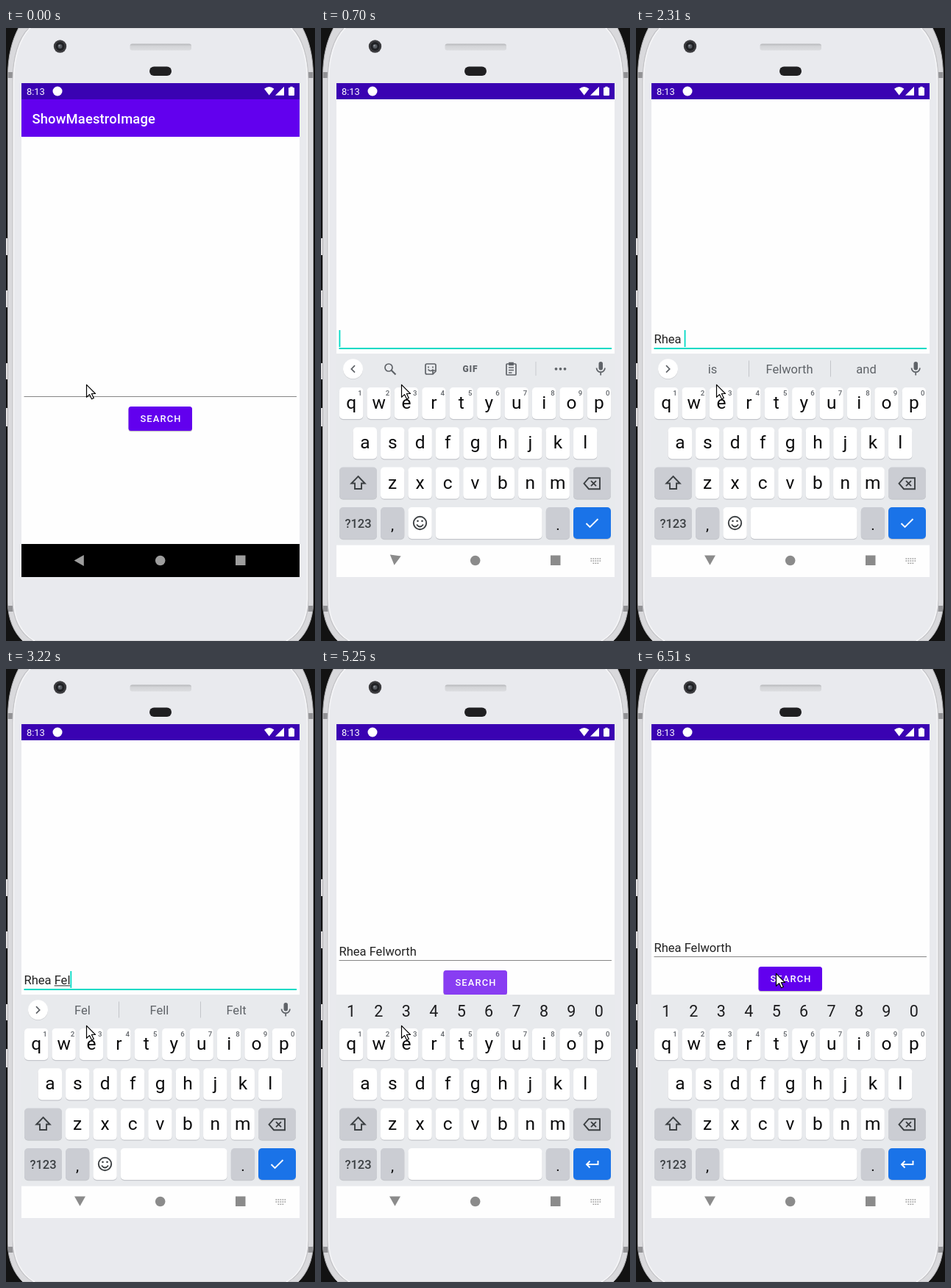
Write an HTML page that moves like this. It is 420 by 834 pixels and loops after 8 s.

```html
<!DOCTYPE html>
<html lang="en">
<head>
<meta charset="utf-8">
<title>Image search</title>
<style>
html,body{margin:0;width:100%;height:100%;overflow:hidden;background:#000}
svg{display:block;width:100%;height:100%}
text{font-family:Roboto,sans-serif;white-space:pre}
.mid{text-anchor:middle}
.line{fill:none;stroke:#5f6368;stroke-width:1.7}
.dark{stroke:#3c4043;stroke-width:1.9}
</style>
</head>
<body>
<svg id="stage" viewBox="0 0 420 834">
  <defs>
    <clipPath id="screen"><rect x="21" y="75" width="378" height="672"/></clipPath>
    <clipPath id="btnClip"><rect x="166.5" y="515" width="86.5" height="33" rx="3.5"/></clipPath>
    <linearGradient id="slot" x2="0" y2="1"><stop stop-color="#b4b5b8"/><stop offset=".35" stop-color="#d3d4d7"/><stop offset="1" stop-color="#dcdde0"/></linearGradient>
  </defs>

  <!-- phone body -->
  <rect width="420" height="834" fill="#121212"/>
  <path d="M0 286h3v23H0zM0 357h3v23H0zM0 456h3v22H0zM0 517h3v25H0z" fill="#e4e2e3"/>
  <path d="M17 0C8 17 2.500 38 2.500 66V782C2.500 804 11 823 23 834H397C409 823 417.500 804 417.500 782V66C417.500 38 412 17 403 0Z" fill="#d9d9dc" stroke="#b2b2b5"/>
  <path d="M2.500 60h6.500v8H2.500zM411 60h6.500v8H411zM2.500 786h7v8H3zM410.500 786h7l-.500 8h-6.500z" fill="#929295"/>
  <path d="M31 0C17 14 9 40 9 72V777C9 805 20 824 37 834H383C400 824 411 805 411 777V72C411 40 403 14 389 0Z" fill="#e9eaee" stroke="#c3c3c6" stroke-width="1.200"/>
  <path d="M33 0C19 14 10.500 40 10.500 72V777C10.500 805 22 824 39 834M387 0C401 14 409.500 40 409.500 72V777C409.500 805 398 824 381 834" fill="none" stroke="#f5f5f7" stroke-width="1.500"/>
  <circle cx="73.500" cy="25" r="8.700" fill="#3c3c3f"/>
  <circle cx="73.500" cy="25" r="6" fill="#202124"/>
  <circle cx="73.500" cy="25" r="3" fill="#565a60"/>
  <circle cx="72.500" cy="24" r="1.200" fill="#8d9197"/>
  <rect x="168.500" y="21.500" width="83.500" height="9" rx="3" fill="url(#slot)"/>
  <rect x="195" y="52.500" width="30" height="12.500" rx="6.200" fill="#1f1f21"/>

  <g clip-path="url(#screen)">
    <rect x="21" y="75" width="378" height="672" fill="#fefefe"/>
    <g id="page">
      <rect x="21" y="97" width="378" height="51" fill="#6200ee"/>
      <text x="35.500" y="130" font-size="18.380" font-weight="500" letter-spacing=".17" fill="#fff">ShowMaestroImage</text>
      <text id="entry" x="24.500" y="495" font-size="16.540" fill="#212121"></text>
      <rect id="under" y="496.400" height="1" fill="#212121"/>
      <rect id="caret" y="477" width="1.800" height="23" fill="#03dac5"/>
      <rect id="rule" x="24.500" y="501" width="370.500"/>
      <rect x="166.500" y="516.200" width="86.500" height="33" rx="3.500" fill="#000" opacity=".22"/>
      <g clip-path="url(#btnClip)">
        <rect x="166" y="515" width="88" height="33" fill="#6200ee"/>
        <rect id="focus" x="166" y="515" width="88" height="33" fill="#fff"/>
        <circle id="ripple" cx="190" cy="527" fill="#fff"/>
      </g>
      <text class="mid" x="210.500" y="536.300" font-size="12.870" font-weight="500" letter-spacing="1.150" fill="#fff">SEARCH</text>
      <rect x="21" y="702" width="378" height="240" fill="#000"/>
    </g>

    <g id="board">
      <rect x="21" y="443" width="378" height="261" fill="#e8eaed"/>
      <rect x="21" y="703.500" width="378" height="44" fill="#fefefe"/>
      <g id="keys"></g>
      <g id="head">
        <circle cx="43.500" cy="464.500" r="13.500" fill="#c9cbcf"/>
        <circle cx="43.500" cy="463.700" r="13.500" fill="#fff"/>
        <path id="chev" class="line"/>
        <g id="tools" class="line">
          <circle cx="92" cy="462" r="5"/><path d="M95.500 465.500l6 6" stroke-width="2.200"/>
          <path d="M144 457h10q2 0 2 2v8l-4 4h-8q-2 0-2-2v-10q0-2 2-2zM156 466h-4v5M145.500 464.500q3.500 4 7 0"/>
          <path d="M146 460.500v2M152 460.500v2"/>
          <text class="mid" x="203" y="468" font-size="12" font-weight="900" letter-spacing=".8" fill="#5f6368" stroke="none">GIF</text>
          <path d="M253 457h11q1 0 1 1v13q0 1-1 1h-11q-1 0-1-1v-13q0-1 1-1zM255 462h7M255 465.500h7M255 469h4.500M256 457.200h5"/>
          <path d="M256 455.500h5v3h-5z" fill="#5f6368"/>
          <path d="M292 454v19" stroke="#c9cbcf" stroke-width="1"/>
          <path d="M319.500 463.800h.01M325.500 463.800h.01M331.500 463.800h.01" stroke-width="3.800" stroke-linecap="round"/>
        </g>
        <g id="hints" font-size="16.540" fill="#5f6368">
          <path d="M153.500 452.500v22M264.500 452.500v22" stroke="#c3c5c9"/>
          <text class="mid" x="104" y="470"></text><text class="mid" x="208.500" y="470"></text><text class="mid" x="313" y="470"></text>
        </g>
        <rect x="377.500" y="454" width="5.500" height="11.500" rx="2.750" fill="#5f6368"/>
        <path class="line" d="M374.500 462.500a5.700 5.700 0 0 0 11.400 0M380.200 468v4.500"/>
      </g>
      <g id="digits" font-size="21.500" fill="#1d1d1f"></g>
      <path id="shift" class="line dark" d="M50.500 610l9.200 9.500h-4.700v7.500h-9v-7.500h-4.700z"/>
      <path class="line dark" d="M364 612.200h15v15h-15l-6.500-7.500zM367 616.200l7 7M374 616.200l-7 7"/>
      <g id="smile" class="line dark"><circle cx="134.500" cy="673.500" r="8.700"/><path d="M130 675.500q4.500 6 9 0"/><path d="M131.500 670.800h.01M137.500 670.800h.01" stroke-width="2.600" stroke-linecap="round"/></g>
      <path id="act" fill="none" stroke="#fff" stroke-width="1.900"/>
    </g>

    <g id="nav">
      <path id="back" d="M-7.200 0L6 -7.500V7.500Z"/>
      <circle cx="209.700" cy="724.500" r="6.800"/>
      <rect x="312" y="717.500" width="13.500" height="13.500"/>
      <path id="switch" d="M366.500 722h14M366.500 725h14M369.500 728.200h8.500" fill="none" stroke="#9b9b9b" stroke-width="1.500" stroke-dasharray="1.700 1.300"/>
    </g>

    <!-- status bar -->
    <rect x="21" y="75" width="378" height="22" fill="#3a02b2"/>
    <g fill="#fff">
      <text x="28" y="91" font-size="12.870">8:13</text>
      <circle cx="70" cy="86" r="6.500"/>
      <path d="M351 82.800Q357.700 77.300 364.400 82.800L357.700 91.500ZM366 91.700L378 79.700V91.700Z"/>
      <path d="M384 82q0-1 1-1h1.300v-1.300h3.400v1.300h1.300q1 0 1 1v9q0 1-1 1h-6q-1 0-1-1z"/>
    </g>
  </g>
  <path id="mouse" d="M0 0V17L4 13.300L7 19.500L9.800 18.200L6.900 12.200H12Z" fill="#fff" stroke="#000" stroke-width="1.200" stroke-linejoin="round"/>
</svg>
<script>
const LOOP = 8000, STEP = 70, PITCH = 37.42;
const $ = id => document.getElementById(id);
const set = (el, attrs) => { for (const k in attrs) el.setAttribute(k, attrs[k]); return el; };
const add = (parent, tag, attrs, text) => {
  const el = set(document.createElementNS('http://www.w3.org/2000/svg', tag), attrs);
  if (text) el.textContent = text;
  parent.appendChild(el);
  return el;
};
const show = (el, on) => { el.style.display = on ? '' : 'none'; };
const clamp = v => Math.max(0, Math.min(1, v));
const decel = v => 1 - (1 - clamp(v)) ** 2;
const ease = v => { v = clamp(v); return v * v * (3 - 2 * v); };

// keyboard
const keys = $('keys'), letters = [];
function key(x, y, w, fill = '#fff') {
  const box = { x, width: w, height: 43, rx: 5 };
  const shade = add(keys, 'rect', { ...box, y: y + 1.2, fill: '#c5c7cc' });
  const face = add(keys, 'rect', { ...box, y, fill });
  return [shade, face];
}
const label = (x, y, size, text, more) =>
  add(keys, 'text', { class: 'mid', x, y, 'font-size': size, fill: '#0c0c0d', ...more }, text);

[['qwertyuiop', 25], ['asdfghjkl', 43.7], ['zxcvbnm', 81]].forEach(([row, left], r) => {
  const y = 489 + r * 54.3;
  [...row].forEach((c, i) => {
    const x = left + i * PITCH;
    key(x, y, 32.3);
    letters.push([label(x + 16.2, y + 29, 24.5, c), c]);
    if (r === 0) {
      const d = String((i + 1) % 10);
      label(x + 28, y + 11.2, 9.6, d, { fill: '#5f6368', 'font-weight': 500 });
      add($('digits'), 'text', { class: 'mid', x: x + 16, y: 472.5 }, d);
    }
  });
});
const GREY = '#cbcdd3';
key(25, 597.6, 51, GREY);
key(343, 597.6, 51, GREY);
key(25, 652, 51, GREY);
key(81, 652, 32.3, GREY);
const smileKey = key(118.4, 652, 32.3);
const space = key(155.8, 652, 144.7);
key(305.8, 652, 32.3, GREY);
key(343, 652, 51, '#1a73e8');
label(50.5, 679.5, 16.5, '?123', { fill: '#3c4043', 'font-weight': 500 });
label(97, 683, 21, ',');
label(322, 683, 21, '.');

// typing: time, characters shown, underlined span
const NAME = 'Rhea Felworth';
const typed = [
  [0, 0], [1260, 1], [1400, 1, 0, 1], [1470, 2, 0, 2], [1680, 3, 0, 2], [1890, 3, 0, 3],
  [2100, 5, 0, 4], [2310, 5], [2450, 6], [2660, 6, 5, 6], [3080, 7, 5, 7], [3220, 8, 5, 8],
  [3430, 9, 5, 9], [3500, 10, 5, 10], [3710, 11, 5, 11], [3850, 13, 5, 12], [4060, 13, 5, 13], [5110, 13]
];
const guesses = [
  [1400, 'R', 'Right', 'Run'], [1470, 'Rh', 'Rhyme', 'Rhino'], [1890, 'Rhe', 'Rhea', 'Rheum'],
  [2100, 'Rhea', 'Rhea\'s', 'Rhetoric'], [2310, 'is', 'Felworth', 'and'], [2660, 'F', 'For', 'Fun'],
  [2800, 'F', 'From', 'For'], [3080, 'Fe', 'Few', 'Feel'], [3220, 'Fel', 'Fell', 'Felt'],
  [3430, 'Felw', 'Fellow', 'Fewer'], [3500, 'Felwo', 'Fellow', 'Follow'],
  [3710, 'Felwor', 'Flower', 'Felwort'], [3850, 'Felwort', 'Felworth', 'Felworths'],
  [4060, 'Felworth', 'Felworths', 'Felworth I']
];
const at = (list, t) => list.filter(e => e[0] <= t).pop();
const pen = document.createElement('canvas').getContext('2d');
pen.font = '16.54px Roboto, sans-serif';
const endX = n => 24.5 + pen.measureText(NAME.slice(0, n)).width;
const hintTexts = [...$('hints').querySelectorAll('text')];

function drawField(t, focused) {
  const [, n, from = 0, to = 0] = at(typed, t);
  $('entry').textContent = NAME.slice(0, n);
  const x = endX(from);
  set($('under'), { x, width: endX(to) - x });
  set($('caret'), { x: endX(n) });
  show($('caret'), focused && !(t >= 1190 && t < 1260) && t < 4620);
  set($('rule'), focused ? { height: 2, fill: '#03dac5' } : { height: 1, fill: '#858585' });
}

function drawBoard(t) {
  const away = clamp((700 - t) / 140);
  const moved = t >= 5110;
  set($('board'), { transform: `translate(0 ${97 * away * away})`, opacity: 1 - .35 * away });
  show($('board'), t >= 560);

  const caps = t >= 1190 && t < 1260;
  for (const [el, c] of letters) el.textContent = caps ? c.toUpperCase() : c;
  $('shift').style.fill = caps ? '#3c4043' : 'none';

  const row = at(guesses, t);
  show($('head'), !moved);
  show($('digits'), moved);
  show($('tools'), !row);
  show($('hints'), row);
  if (row) hintTexts.forEach((el, i) => { el.textContent = row[i + 1]; });
  set($('chev'), { d: row ? 'M41 459.200l4.700 4.700-4.700 4.700' : 'M46 459.200l-4.700 4.700 4.700 4.700' });

  show($('smile'), !moved);
  smileKey.forEach(el => show(el, !moved));
  space.forEach(el => set(el, moved ? { x: 118.4, width: 182.1 } : { x: 155.8, width: 144.7 }));
  set($('act'), { d: moved ? 'M376.500 669v5h-15M365.500 669.500l-4.500 4.500 4.500 4.500' : 'M360.500 674l5 5 11-11' });
}

function drawNav(t) {
  const up = t >= 560;
  const turn = up ? -90 * (1 - (clamp((840 - t) / 280) ** 3) * .65) : 0;
  set($('back'), { transform: `translate(${up ? 100.5 : 99.8} ${up ? 723.5 : 724.5}) rotate(${turn})` });
  set($('nav'), { fill: up ? '#8b8b8b' : '#9d9d9d', opacity: up ? Math.min(1, .25 + (t - 560) / 180) : 1 });
  show($('switch'), t >= 420);
}

function drawButton(t) {
  const steps = (start, count) => clamp((Math.floor((t - start) / STEP) + 1) / count);
  const press = steps(6090, 3), release = steps(6370, 3);
  set($('focus'), { opacity: t < 5110 ? 0 : .24 * (1 - press) });
  set($('ripple'), { r: 72 * press, opacity: .24 * (1 - release) });
}

function draw(ms) {
  const t = Math.floor(ms / STEP + 1e-6) * STEP;
  const focused = t >= 280 && t < 5110;
  const first = t < 560 ? 0 : decel((t - 456) / 250);
  const second = t < 5110 ? 0 : decel((t - 5087) / 250);
  set($('page'), { transform: `translate(0 ${-Math.round(66 * first + 44 * second)})` });
  drawField(t, focused);
  drawBoard(t);
  drawNav(t);
  drawButton(t);
  const go = ease((t - 5530) / 350);
  set($('mouse'), { transform: `translate(${109.5 + 81 * go} ${485.3 - 71 * go})` });
}

const start = performance.now();
function tick() {
  draw((performance.now() - start) % LOOP);
  requestAnimationFrame(tick);
}
tick();
</script>
</body>
</html>
```
